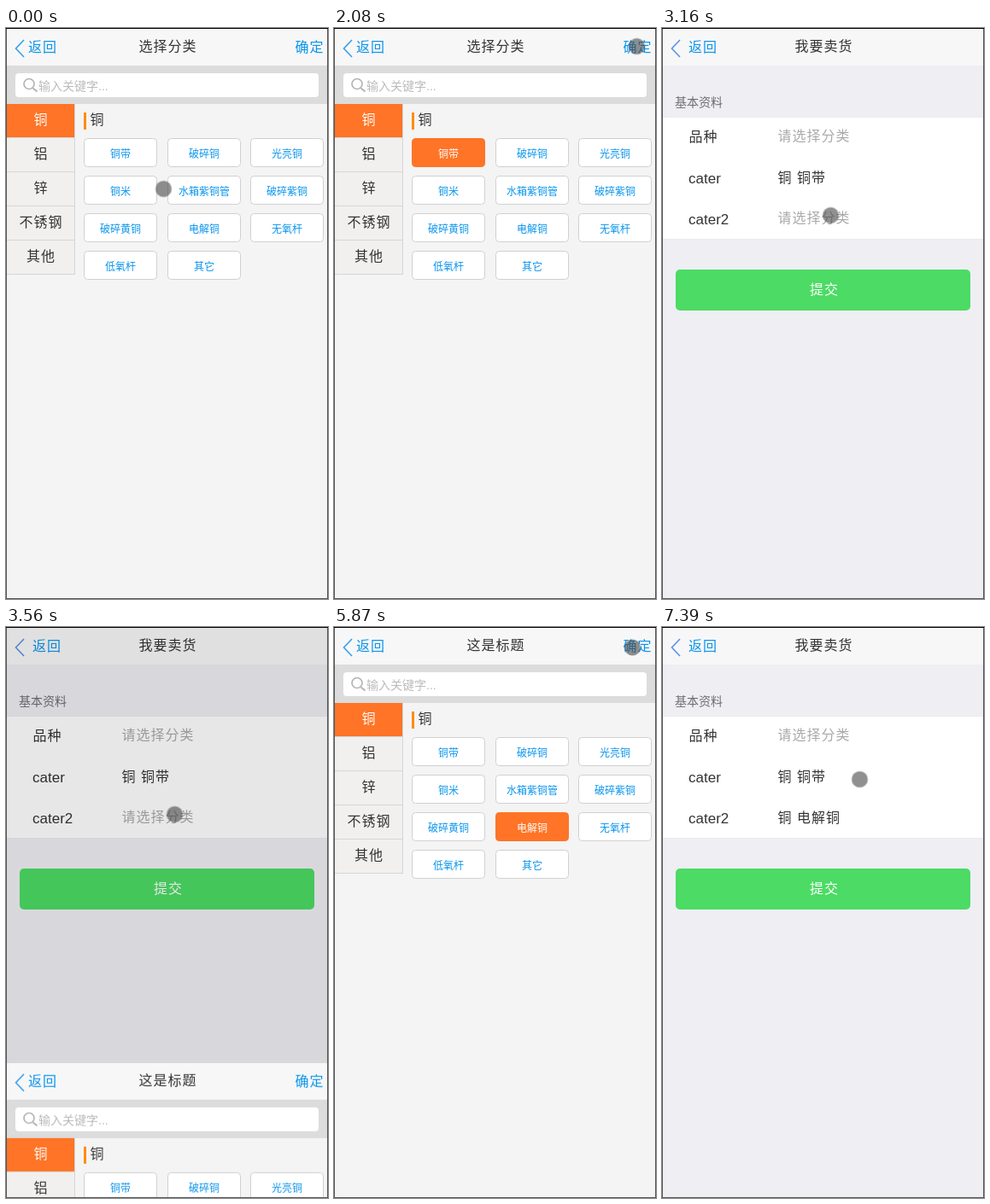
These frames come from a looping animation (377 by 669 pixels, 8 s). An HTML page:

```html
<!DOCTYPE html>
<html lang="zh-CN">
<head>
<meta charset="utf-8">
<title>选择分类</title>
<style>
html, body { margin: 0; width: 100%; height: 100%; overflow: hidden; background: #eeeef3; }
svg { display: block; width: 377px; height: 669px; }
text {
  font: 300 16px "Liberation Sans", "Noto Sans CJK SC", "Noto Sans CJK", sans-serif;
  letter-spacing: 1px; fill: #333; white-space: pre;
}
.mid { text-anchor: middle; }
.link { fill: #0894ec; }
.latin { font-size: 17px; letter-spacing: 0; }
.small { font-size: 14px; letter-spacing: 0; }
.hint { fill: #a9a9a9; }
.white { fill: #fff; }
.chip text { font-size: 12px; font-weight: 400; letter-spacing: 0; text-anchor: middle; fill: #0894ec; }
.chip rect { fill: #fff; stroke: #d0d0d0; }
.picked rect { fill: #ff7426; stroke: #ff7426; }
.picked text { fill: #fff; }
.back { fill: none; stroke: #35a0ee; stroke-width: 1.6; }

/* One loop is 8000 ms, so 1% is 80 ms. */
#sheet { animation: sheet 8s ease infinite; }
#dim { animation: dim 8s ease infinite; }
#cursor { animation: cursor 8s ease-in-out infinite; }
.first { animation: first 8s step-end infinite; }
.second { animation: second 8s step-end infinite; }
.pickA { animation: pickA 8s step-end infinite; }
.pickB { animation: pickB 8s step-end infinite; }
.empty { animation: empty 8s step-end infinite; }
.filled { animation: filled 8s step-end infinite; }

@keyframes sheet {
  0%, 26.7% { transform: translateY(0); }
  32.53%, 43.5% { transform: translateY(669px); }
  49.3%, 80% { transform: translateY(0); }
  85.8%, 100% { transform: translateY(669px); }
}
@keyframes dim {
  0%, 26.5% { opacity: .4; }
  32.33%, 43.5% { opacity: 0; }
  49.3%, 80% { opacity: .4; }
  85.8%, 100% { opacity: 0; }
}
@keyframes cursor {
  0%, 1.2% { transform: translate(184.5px, 188.5px); }
  11.2%, 15% { transform: translate(148px, 152px); }
  25.7%, 32% { transform: translate(354.5px, 21.5px); }
  39.3%, 54.3% { transform: translate(197.5px, 219.5px); }
  61.4%, 65.3% { transform: translate(233px, 236px); }
  73.2%, 86% { transform: translate(349.5px, 24px); }
  92.2%, 100% { transform: translate(231.5px, 178.5px); }
}
@keyframes first { 0% { opacity: 1; } 41%, 100% { opacity: 0; } }
@keyframes second { 0% { opacity: 0; } 41%, 100% { opacity: 1; } }
@keyframes pickA { 0% { opacity: 0; } 13.5% { opacity: 1; } 41%, 100% { opacity: 0; } }
@keyframes pickB { 0% { opacity: 0; } 64.9%, 100% { opacity: 1; } }
@keyframes empty { 0% { opacity: 1; } 79.5%, 100% { opacity: 0; } }
@keyframes filled { 0% { opacity: 0; } 79.5%, 100% { opacity: 1; } }
</style>
</head>
<body>
<svg viewBox="0 0 377 669">
  <clipPath id="screen"><path d="M1 1h375v667H1z"/></clipPath>
  <rect width="377" height="669" fill="#555"/>
  <rect width="377" height="1" fill="#000"/>

  <g clip-path="url(#screen)">
    <g id="form">
      <rect width="377" height="669" fill="#eeeef3"/>
      <rect width="377" height="44" fill="#f7f7f8"/>
      <path class="back" d="M21 14L11.500 24L21 34" style="stroke:#5b93e6"/>
      <text class="link" x="31" y="28">返回</text>
      <text class="mid" x="189.500" y="27">我要卖货</text>
      <text class="small" x="15" y="92" style="fill:#6d6d72">基本资料</text>
      <rect y="104" width="377" height="144" fill="#ebebef"/>
      <rect y="105" width="377" height="142" fill="#fff"/>
      <text x="31.500" y="133">品种</text>
      <text class="latin" x="31" y="182">cater</text>
      <text class="latin" x="31" y="230">cater2</text>
      <text class="hint" x="135.500" y="132">请选择分类</text>
      <text x="135.500" y="181">铜 铜带</text>
      <text class="hint empty" x="135.500" y="228">请选择分类</text>
      <text class="filled" x="135.500" y="229">铜 电解铜</text>
      <rect x="16" y="283" width="345" height="48" rx="5" fill="#4cdb64"/>
      <text class="mid white" x="190" y="312">提交</text>
    </g>

    <rect id="dim" width="377" height="669"/>

    <g id="sheet">
      <rect y="1" width="377" height="668" fill="#f4f4f4"/>
      <rect y="1" width="377" height="43" fill="#f7f7f8"/>
      <path class="back" d="M21 14L11.500 24L21 34"/>
      <text class="link" x="26" y="28">返回</text>
      <text class="mid first" x="189.500" y="27">选择分类</text>
      <text class="mid second" x="189.500" y="27">这是标题</text>
      <text class="link" x="338.500" y="28">确定</text>
      <rect y="44" width="377" height="45" fill="#dcdcdc"/>
      <rect x="11" y="53" width="355" height="28" rx="4" fill="#fff"/>
      <path d="M31.500 70.500L36.500 74.500" stroke="#b4b4b4" stroke-width="2"/>
      <circle cx="27" cy="65.500" r="6" fill="none" stroke="#b4b4b4" stroke-width="1.700"/>
      <text class="small" x="38" y="73" style="fill:#bbb">输入关键字...</text>
      <g id="sidebar"></g>
      <rect x="91" y="99" width="3" height="20" fill="#ff8c14"/>
      <text x="98.500" y="113">铜</text>
      <g id="chips"></g>
    </g>

    <circle id="cursor" r="9.500" fill="#464646" fill-opacity=".6"/>
  </g>
</svg>
<script>
const metals = ['铜', '铝', '锌', '不锈钢', '其他'];
const kinds = ['铜带', '破碎铜', '光亮铜', '铜米', '水箱紫铜管', '破碎紫铜',
  '破碎黄铜', '电解铜', '无氧杆', '低氧杆', '其它'];
const columns = [91, 189, 286];

function tab(name, i) {
  const y = 89 + 40 * i;
  const active = i === 0;
  return `<rect x="1" y="${y}" width="80" height="40" fill="#d6d6d6"/>
    <rect x="1" y="${y}" width="79" height="39" fill="${active ? '#ff7426' : '#f1f0ee'}"/>
    <text class="mid ${active ? 'white' : ''}" x="41" y="${y + 24}">${name}</text>`;
}

function chip(i, extra = '') {
  const x = columns[i % 3];
  const y = 129 + 44 * Math.floor(i / 3);
  return `<g class="chip ${extra}">
    <rect x="${x + .5}" y="${y + .5}" width="85" height="33" rx="4"/>
    <text x="${x + 43}" y="${y + 23}">${kinds[i]}</text></g>`;
}

document.getElementById('sidebar').innerHTML = metals.map(tab).join('');
document.getElementById('chips').innerHTML = kinds.map((_, i) => chip(i)).join('')
  + chip(0, 'picked pickA') + chip(7, 'picked pickB');
</script>
</body>
</html>
```
